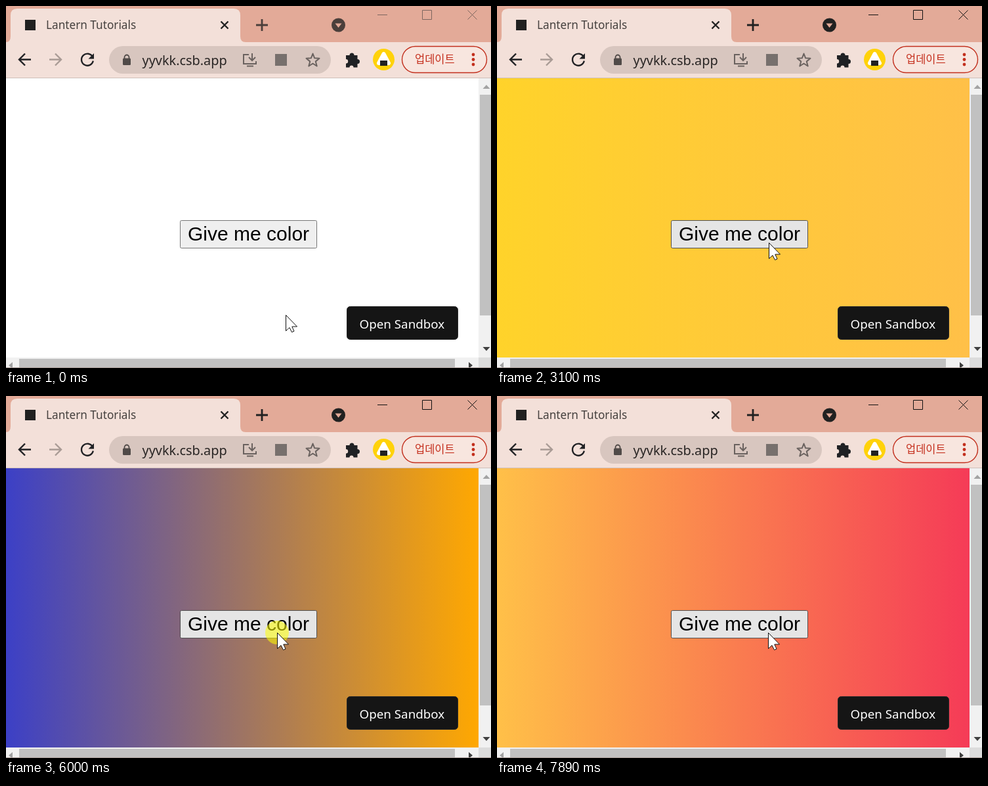
These frames come from a looping animation (739 px wide and 551 px high, 8 s). An HTML page:

```html
<!DOCTYPE html>
<html lang="ko">
<head>
<meta charset="utf-8">
<title>Give me color</title>
<style>
html, body { margin: 0; width: 100%; height: 100%; overflow: hidden; background: #fff; }
svg { display: block; width: 739px; height: 551px; cursor: default; }
text { font-family: "Noto Sans", "Open Sans", sans-serif; white-space: pre; }
.line { fill: none; stroke-width: 2.4; }
.chrome { --ink: #4b3f3b; --thin: #7d665f; }
.chrome.focus { --ink: #212121; --thin: #111; }
.ink { stroke: var(--ink); }
.thin { fill: none; stroke: var(--thin); stroke-width: 1; }
#button { fill: #efefef; stroke: #767676; }
#button.hover { fill: #e5e5e5; stroke: #4f4f4f; }
#button.active { fill: #f5f5f5; stroke: #8d8d8d; }
</style>
</head>
<body>
<svg viewBox="0 0 739 551">
  <defs>
    <linearGradient id="blend">
      <stop id="from" offset="0" stop-color="#fff"/>
      <stop id="to" offset="1" stop-color="#fff"/>
    </linearGradient>
  </defs>

  <!-- window frame -->
  <g id="chrome" class="chrome">
    <rect width="739" height="56" fill="#e3aa98"/>
    <path d="M0 55Q7 55 7 46V14Q7 4 17 4H347Q357 4 357 14V46Q357 55 365 55V110H0Z" fill="#f3e0d9"/>
    <rect y="55" width="739" height="54" fill="#f3e0d9"/>
    <rect y="109" width="739" height="1" fill="#cfc0ba"/>
    <rect x="29" y="21" width="16" height="16" fill="#202020"/>
    <text x="61" y="35" font-size="17.2" fill="#45403e">Lantern Tutorials</text>
    <path class="line" d="M327.500 23.500l11 11m0-11l-11 11" stroke="#222"/>
    <path class="line ink" d="M381 29h18m-9-9v18" style="stroke-width:2.800"/>
    <circle cx="506.500" cy="29" r="10.500" fill="var(--ink)"/>
    <path d="M501.500 26.500h10l-5 6.500z" fill="#e3aa98"/>
    <path class="thin" d="M566 13.500h15M634.500 6.500h14v14h-14zM703.500 6.500l14 14m0-14l-14 14"/>
  </g>

  <!-- toolbar -->
  <g class="line" stroke="#202124">
    <path d="M38 81.500H20m9-9l-9 9 9 9"/>
    <path d="M66 81.500h18m-9-9l9 9-9 9" stroke="#a99b95"/>
    <path d="M132 77.500a9 9 0 1 0 .800 6"/>
    <path d="M134 72v8.500h-8.500z" fill="#202124" stroke="none"/>
  </g>
  <rect x="157" y="61" width="338" height="42" rx="21" fill="#d8c6bf"/>
  <rect x="178" y="79.500" width="12" height="10.500" rx="1.500" fill="#504a48"/>
  <path d="M180.500 80v-2a3.500 3.500 0 0 1 7 0v2" fill="none" stroke="#504a48" stroke-width="1.800"/>
  <text x="207.500" y="90" font-size="19.900" fill="#292524">yyvkk.csb.app</text>
  <g fill="none" stroke="#6a625f" stroke-width="2">
    <path d="M370 74h-8v14h19v-4M367 91.500h10M375 72v10m-5-4l5 5 5-5"/>
    <path id="star" stroke-linejoin="round"/>
  </g>
  <rect x="410" y="73" width="18" height="18" fill="#77706d"/>
  <path d="M518 75h5.500a3.500 3.500 0 0 1 7 0h5v6a3.500 3.500 0 0 1 0 7v5.500h-6a3 3 0 0 0-6 0H518v-6a3.200 3.200 0 0 0 0-6.400z" fill="#202124"/>
  <circle cx="575.500" cy="81.500" r="16.500" fill="#ffd20a"/>
  <path d="M575.500 73l7.500 14h-15z" fill="#fff" stroke="#fff" stroke-width="6" stroke-linejoin="round"/>
  <rect x="570" y="83" width="11" height="8" fill="#222"/>
  <rect x="603.500" y="61.500" width="129" height="40" rx="20" fill="#f8e6df" stroke="#c22f1d" stroke-width="1.400"/>
  <text x="623" y="87" font-size="16.500" fill="#c5301e" style="font-family:'Noto Sans CJK KR','Noto Sans CJK',sans-serif">업데이트</text>
  <g fill="#c22f1d">
    <circle cx="712" cy="74" r="2.400"/><circle cx="712" cy="81.500" r="2.400"/><circle cx="712" cy="89" r="2.400"/>
  </g>

  <!-- page -->
  <rect y="110" width="720" height="425" fill="url(#blend)"/>
  <rect id="button" x="265.500" y="326.500" width="208" height="42" rx="2"/>
  <text x="277" y="357" font-size="30" fill="#000" style="font-family:'Liberation Sans',Arial,sans-serif">Give me color</text>
  <rect x="519.500" y="457.500" width="169" height="50" rx="5" fill="#151515" stroke="#292929"/>
  <text x="538.500" y="491" font-size="18.800" font-weight="500" fill="#fff">Open Sandbox</text>

  <!-- scrollbars -->
  <path d="M720 110h19v425h-19zM0 535h720v16H0z" fill="#f1f1f1"/>
  <rect x="720" y="535" width="19" height="16" fill="#dcdcdc"/>
  <path d="M722 135h17v336h-17zM20 537h664v14H20z" fill="#c1c1c1"/>
  <path d="M726.500 126h11l-5.500-6zM10 542v10l-6-5z" fill="#a3a3a3"/>
  <path d="M726.500 519h11l-5.500 6zM705 542v10l6-5z" fill="#404040"/>
  <rect y="550" width="739" height="1" fill="#a99a96"/>

  <!-- pointer -->
  <circle id="halo" cx="413" cy="360" r="18" fill="#ff0" fill-opacity=".55" visibility="hidden"/>
  <path id="pointer" d="M.500 .500V24.500L6 19.500 9.500 26.500 13 25 9.800 18H17.500Z" fill="#fff" stroke="#111"/>
</svg>
<script>
const LOOP = 8000;
const $ = id => document.getElementById(id);

// press, release and halo end in ms, then the two colours picked
const clicks = [
  [670, 740, 940, "#4bcffa", "#ff5e57"],
  [1080, 1150, 1220, "#0be881", "#ffc048"],
  [1320, 1390, 1460, "#ef5777", "#3c40c6"],
  [1560, 1630, 1700, "#575fcf", "#485460"],
  [2030, 2160, 2160, "#ffa801", "#d2dae2"],
  [2560, 2630, 2630, "#05c46b", "#0fbcf9"],
  [2960, 3030, 3100, "#ffd32a", "#ffc048"],
  [3500, 3570, 3630, "#ef5777", "#34e7e4"],
  [3850, 3920, 3990, "#485460", "#ffdd59"],
  [4190, 4260, 4330, "#ff3f34", "#575fcf"],
  [4510, 4580, 4650, "#ffa801", "#575fcf"],
  [4910, 4980, 5120, "#00d8d6", "#ef5777"],
  [5190, 5260, 5330, "#d2dae2", "#ffa801"],
  [5400, 5470, 5600, "#f53b57", "#05c46b"],
  [5720, 5790, 5860, "#ffdd59", "#4bcffa"],
  [5930, 6000, 6080, "#3c40c6", "#ffa801"],
  [6210, 6280, 6350, "#ff5e57", "#d2dae2"],
  [6530, 6600, 6670, "#0fbcf9", "#485460"],
  [6740, 6810, 6880, "#ffc048", "#ef5777"],
  [7030, 7100, 7220, "#ff5e57", "#f53b57"],
  [7220, 7350, 7420, "#ffd32a", "#05c46b"],
  [7490, 7560, 7630, "#575fcf", "#ff3f34"],
  [7750, 7820, 7890, "#ffc048", "#f53b57"]
];

// start in ms, x, y
const moves = [
  [0, 426, 470], [70, 428, 438], [140, 430, 398],
  [210, 427, 370], [600, 414, 360], [4780, 413, 360]
];

const starPoints = Array.from({ length: 10 }, (_, i) => {
  const r = i % 2 ? 4.5 : 10.5, a = (i / 5 - 0.5) * Math.PI;
  return `${467.5 + r * Math.cos(a)} ${83 + r * Math.sin(a)}`;
});
$("star").setAttribute("d", `M${starPoints.join("L")}Z`);

function draw(t) {
  const picked = clicks.findLast(c => c[1] <= t);
  const active = clicks.some(([press, release]) => press <= t && t < release);
  const halo = clicks.some(([press, , end]) => press <= t && t < end);
  const [, x, y] = moves.findLast(m => m[0] <= t);

  $("from").setAttribute("stop-color", picked ? picked[3] : "#fff");
  $("to").setAttribute("stop-color", picked ? picked[4] : "#fff");
  $("chrome").classList.toggle("focus", t >= clicks[0][0]);
  $("button").setAttribute("class", active ? "active" : t >= 600 ? "hover" : "");
  $("halo").setAttribute("visibility", halo ? "visible" : "hidden");
  $("pointer").setAttribute("transform", `translate(${x} ${y})`);
}

const start = performance.now();
function tick() {
  draw((performance.now() - start) % LOOP);
  requestAnimationFrame(tick);
}
tick();
</script>
</body>
</html>
```
